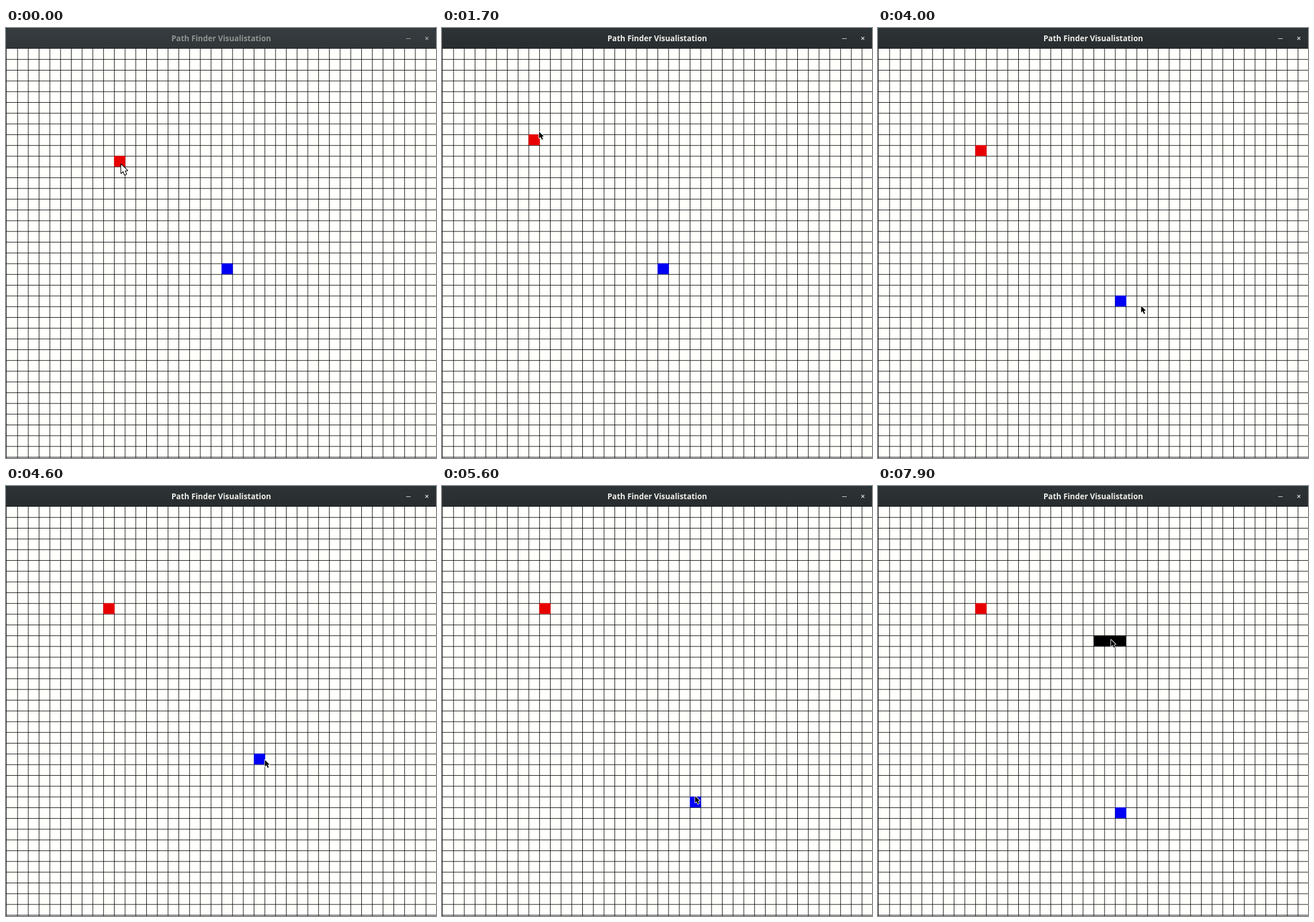
An HTML page with a canvas for the animation above (8000 ms loop, 748 by 748 pixels).

```html
<!DOCTYPE html>
<html lang="en">
<head>
<meta charset="utf-8">
<title>Path Finder Visualistation</title>
<style>
html, body { margin: 0; width: 100%; height: 100%; overflow: hidden; background: #fffffc; }
canvas { display: block; }
</style>
</head>
<body>
<canvas id="stage" width="748" height="748"></canvas>
<script>
const ctx = document.getElementById('stage').getContext('2d');
const SIZE = 748, LOOP = 8000, TICK = 100;
// The window is an 800 px board shrunk to fit; cells are 20 board pixels.
const SCALE = SIZE / 800, CELL = 20, LEFT = 1, TOP = 38;

const mix = (a, b, k) => a + (b - a) * k;

const to = (x, y) => (k, from) => [mix(from[0], x, k), mix(from[1], y, k)];

const bezier = (a, b, end) => (k, from) => [0, 1].map(i =>
  from[i] * (1 - k) ** 3 + 3 * a[i] * k * (1 - k) ** 2 + 3 * b[i] * k * k * (1 - k) + end[i] * k ** 3);

// Elliptic spiral; each range is [first, last], angles in degrees.
const spiral = (cx, cy, rx, ry, angle) => k => {
  const a = mix(...angle, k) * Math.PI / 180;
  return [cx + mix(...rx, k) * Math.cos(a), cy + mix(...ry, k) * Math.sin(a)];
};

// Pointer moves: first tick, last tick, curve.
const moves = [
  [10, 17, spiral(198, 195, [42, 33], [42, 33], [90, 567])],
  [17, 20, to(171, 204)],
  [21, 22, to(180, 204)],
  [27, 29, to(325, 371)],
  [31, 32, to(370, 403)],
  [32, 34, to(384, 412)],
  [35, 36, to(386, 413)],
  [38, 46, spiral(450, 446, [64, 36], [40, 30], [200, -270])],
  [46, 55.5, bezier([580, 430], [490, 250], [444, 545])],
  [55.5, 56, to(440, 539)],
  [56, 60, to(422, 568)],
  [64, 67, to(395, 286)],
  [68, 70, to(425, 269)],
  [77, 78, to(388, 267)],
  [78, 79, to(405, 267)]
];

const red = { color: '#e80000', grab: 11, drop: 20, from: [10, 10], to: [9, 9] };
const blue = { color: '#0000f3', grab: 39, drop: 60, from: [20, 20], to: [22, 28] };

function pointer(tick) {
  let pos = [200, 237];
  for (const [first, last, curve] of moves) {
    if (tick < first) break;
    pos = curve(Math.min(1, (tick - first) / (last - first)), pos);
  }
  return pos;
}

// A dragged cell trails the pointer by half a tick.
function cellOf(piece, tick) {
  if (tick < piece.grab) return piece.from;
  if (tick >= piece.drop) return piece.to;
  const [x, y] = pointer(tick - 0.5);
  return [Math.floor((x / SCALE - LEFT) / CELL), Math.floor((y / SCALE - TOP) / CELL)];
}

function fillCell([c, r], color) {
  ctx.fillStyle = color;
  ctx.fillRect(LEFT + CELL * c, TOP + CELL * r, CELL + 1, CELL);
}

function drawBoard(tick) {
  ctx.save();
  ctx.scale(SCALE, SCALE);
  ctx.fillStyle = '#000';
  ctx.fillRect(0, TOP, 1, 800);
  for (let i = 1; i < 40; i++) {
    ctx.fillRect(LEFT + CELL * i, TOP, 1, 800);
    ctx.fillRect(0, TOP + CELL * i, 800, 1);
  }
  for (const piece of [red, blue]) fillCell(cellOf(piece, tick), piece.color);
  const walls = tick >= 78 ? 3 : tick >= 75 ? 1 : 0;
  for (let i = 0; i < walls; i++) fillCell([22 - i, 12], '#000');
  ctx.restore();
}

function strokeLine(x1, y1, x2, y2) {
  ctx.beginPath();
  ctx.moveTo(x1, y1);
  ctx.lineTo(x2, y2);
  ctx.stroke();
}

function drawTitle(active) {
  ctx.fillStyle = '#10343c';
  ctx.fillRect(0, 0, SIZE, 8);
  const shade = ctx.createLinearGradient(0, 0, 0, 35);
  shade.addColorStop(0, active ? '#2d3336' : '#363c3f');
  shade.addColorStop(1, active ? '#282d2f' : '#313739');
  ctx.fillStyle = shade;
  ctx.beginPath();
  ctx.roundRect(0, 0, SIZE, 36, [6, 6, 0, 0]);
  ctx.fill();
  ctx.fillStyle = '#15191a';
  ctx.fillRect(0, 35, SIZE, 1);

  ctx.fillStyle = active ? '#eeeeea' : '#909392';
  ctx.font = '700 13.45px "Open Sans", "Noto Sans", sans-serif';
  ctx.textAlign = 'center';
  ctx.textBaseline = 'alphabetic';
  ctx.fillText('Path Finder Visualistation', 374.4, 23);

  ctx.strokeStyle = active ? '#d5d8d5' : '#a3a7a6';
  ctx.lineWidth = 1;
  strokeLine(696, 18.5, 704, 18.5);
  ctx.lineWidth = 1.2;
  strokeLine(729.5, 15.5, 734.5, 20.5);
  strokeLine(734.5, 15.5, 729.5, 20.5);
}

function drawArrow([x, y], scale, fill, edge) {
  const shape = [[0, 0], [0, 11.5], [2.7, 9], [4.8, 13.8], [6.8, 12.9], [4.8, 8.3], [8.2, 8]];
  ctx.save();
  ctx.translate(x + 0.3, y + 0.4);
  ctx.scale(scale, scale);
  ctx.beginPath();
  shape.forEach(p => ctx.lineTo(...p));
  ctx.closePath();
  ctx.fillStyle = fill;
  ctx.strokeStyle = edge;
  ctx.lineWidth = 1.8;
  ctx.lineJoin = 'round';
  ctx.stroke();
  ctx.fill();
  ctx.restore();
}

function draw(ms) {
  const tick = Math.floor(ms % LOOP / TICK);
  ctx.fillStyle = '#fffffc';
  ctx.fillRect(0, 0, SIZE, SIZE);
  drawBoard(tick);
  drawTitle(tick >= 9);
  if (tick < 1) drawArrow(pointer(tick), 1.3, '#fff', '#000');
  else drawArrow(pointer(tick), 1, '#000', '#fff');
}

const start = performance.now();
function frame() {
  draw(performance.now() - start);
  requestAnimationFrame(frame);
}
frame();
</script>
</body>
</html>
```
